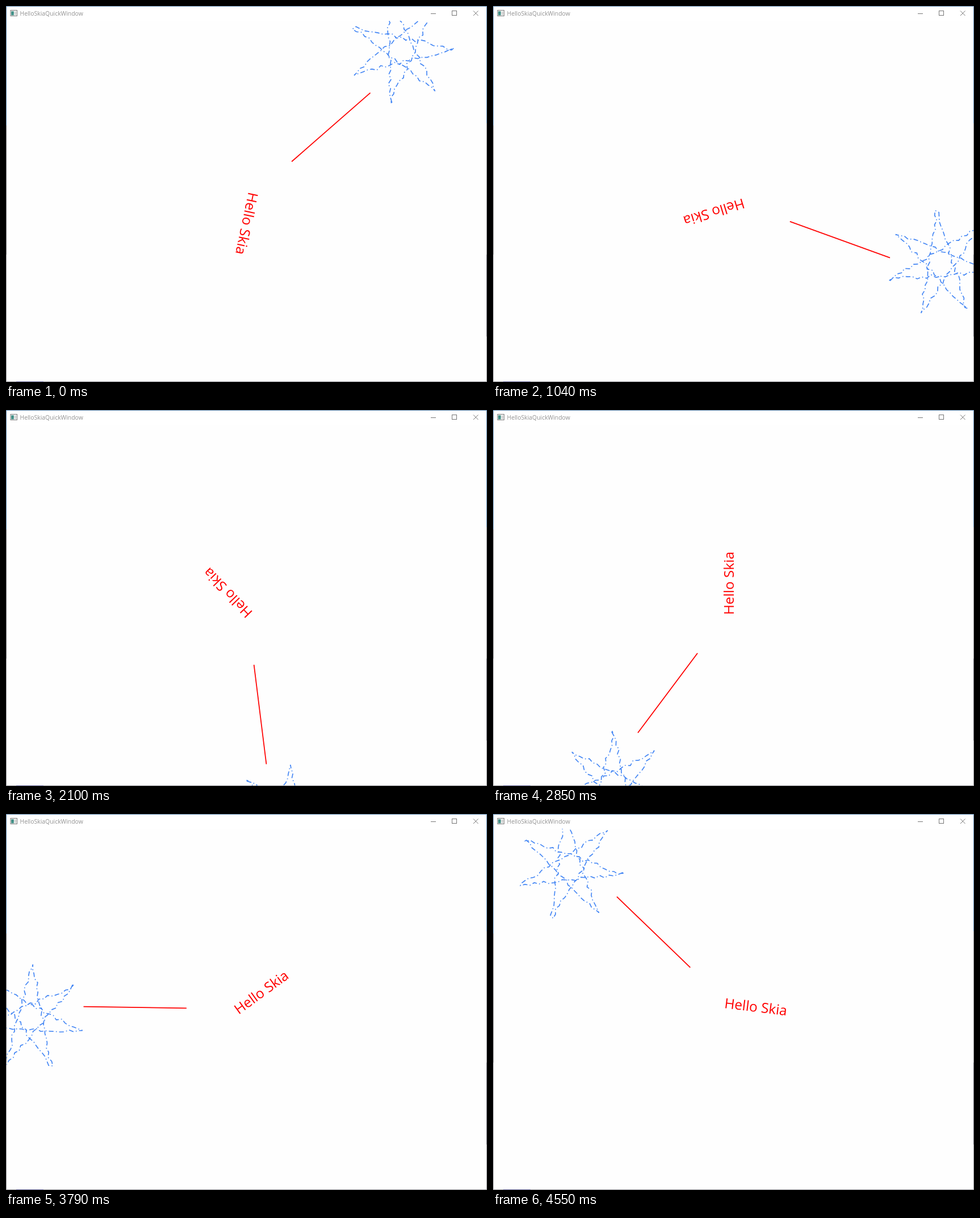
Recreate the animation shown at these times as an HTML page. Size 847 by 661 pixels, loop 4580 ms.

```html
<!DOCTYPE html>
<html lang="en">
<head>
<meta charset="utf-8">
<title>HelloSkiaQuickWindow</title>
<style>
  html, body { margin: 0; width: 100%; height: 100%; overflow: hidden; background: #fff; }
  svg { display: block; width: 847px; height: 661px; }
  text { font-family: "Open Sans", "Noto Sans", sans-serif; }
</style>
</head>
<body>
<svg viewBox="0 0 847 661" xmlns="http://www.w3.org/2000/svg">
  <defs>
    <clipPath id="view"><rect x="1" y="26" width="845" height="634"/></clipPath>
  </defs>
  <rect width="847" height="661" fill="#fff"/>
  <rect x="1" y="26" width="845" height="634" fill="#fefefe"/>

  <g clip-path="url(#view)">
    <g id="scene">
      <path id="star" transform="translate(-422.5 -317) scale(.825)" fill="none"
            stroke="#4285f4" stroke-width="2" stroke-dasharray="10 5 2 5"/>
      <line id="ray" stroke="#f00" stroke-width="1.75"/>
      <text x="-17" y="0" font-size="24.4" fill="#f00">Hello Skia</text>
    </g>
  </g>

  <!-- window frame -->
  <g shape-rendering="crispEdges">
    <rect width="847" height="1" fill="#5580a8"/>
    <rect width="1" height="210" fill="#5580a8"/>
    <rect y="210" width="1" height="227" fill="#6a6a6e"/>
    <rect y="437" width="1" height="224" fill="#909094"/>
    <rect x="846" width="1" height="206" fill="#5580a8"/>
    <rect x="846" y="206" width="1" height="231" fill="#85858a"/>
    <rect x="846" y="437" width="1" height="144" fill="#5c5c66"/>
    <rect x="846" y="581" width="1" height="80" fill="#909094"/>
    <rect y="660" width="847" height="1" fill="#8e8e92"/>
    <rect x="18" y="660" width="48" height="1" fill="#56568c"/>
  </g>

  <!-- title bar -->
  <rect x="8" y="7.5" width="11.5" height="10" fill="#f4f4f4" stroke="#7c7c7c"/>
  <rect x="9.2" y="9.3" width="4.6" height="7" fill="#3f8f86"/>
  <rect x="15" y="9.5" width="3" height="6.5" fill="#d4d4d4"/>
  <text x="24.5" y="17" font-size="10.4" fill="#929292">HelloSkiaQuickWindow</text>
  <g fill="none" stroke="#777">
    <path d="M748 13.5h9"/>
    <rect x="785.5" y="8.5" width="8" height="8"/>
    <path d="M823 8.5l8.5 8.5M831.5 8.5l-8.5 8.5"/>
  </g>
</svg>
<script>
const LOOP = 4580;
const $ = id => document.getElementById(id);
const scene = $("scene"), ray = $("ray");

// Seven-pointed star, cut into short pieces that are pushed sideways at random.
function roughStar(radius, mid, piece, push) {
  const tip = i => {
    const a = i * 6 * Math.PI / 7;
    return [mid + radius * Math.cos(a), mid + radius * Math.sin(a)];
  };
  const side = 2 * radius * Math.sin(3 * Math.PI / 7);
  const total = 7 * side;
  let seed = Math.imul(Math.round(total), 65537);
  const rand = () => {
    seed = (Math.imul(seed, 1664525) + 1013904223) | 0;
    return (seed >> 15) / 65536;
  };
  const n = Math.round(total / piece), points = [];
  for (let i = 0; i <= n; i++) {
    const d = i * total / n;
    const k = Math.min(6, Math.floor(d / side));
    const [x, y] = tip(k), [x2, y2] = tip(k + 1);
    const tx = (x2 - x) / side, ty = (y2 - y) / side;
    const along = d - k * side, off = push * rand();
    points.push((x + tx * along + ty * off).toFixed(2) + " " +
                (y + ty * along - tx * off).toFixed(2));
  }
  return "M" + points.join("L");
}

// time, turn in degrees, outer radius of the ray
const keys = [
  [0, 102, 289.5], [420, 128, 285], [1040, 163, 293], [2100, 226, 281.7],
  [2850, 270, 280.7], [3790, 324, 287], [4550, 367, 285]
];

function sample(t) {
  let i = 0;
  while (i < keys.length - 2 && t >= keys[i + 1][0]) i++;
  const a = keys[i], b = keys[i + 1];
  const f = Math.min(1, (t - a[0]) / (b[0] - a[0]));
  return [1, 2].map(j => a[j] + (b[j] - a[j]) * f);
}

function draw(t) {
  const [turn, reach] = sample(t);
  // the scene turns in whole degrees
  scene.setAttribute("transform", `translate(423.5 343) rotate(${Math.floor(turn + 0.2)})`);
  ray.setAttribute("x2", -0.8 * reach);
  ray.setAttribute("y2", -0.6 * reach);
}

$("star").setAttribute("d", roughStar(115.2, 128, 10, 4));
ray.setAttribute("x1", -84.5);
ray.setAttribute("y1", -63.4);

const start = performance.now();
function tick() {
  draw((performance.now() - start) % LOOP);
  requestAnimationFrame(tick);
}
draw(0);
requestAnimationFrame(tick);
</script>
</body>
</html>
```
